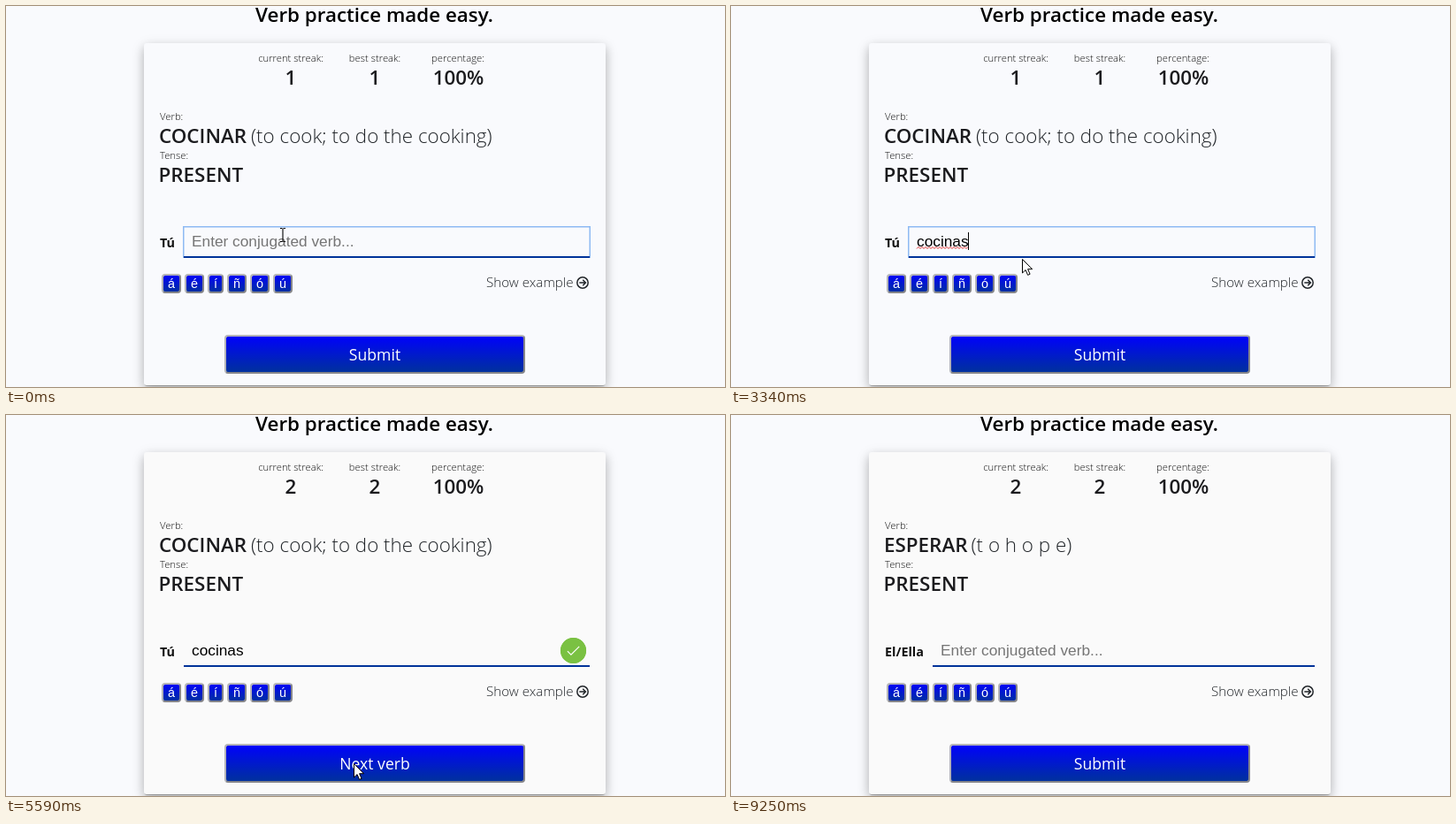
These frames come from a looping animation (813 by 431 pixels, 9.35 s). An HTML page:

```html
<!DOCTYPE html>
<html lang="en">
<head>
<meta charset="utf-8">
<title>Verb practice</title>
<style>
  html, body { margin: 0; width: 100%; height: 100%; overflow: hidden; background: #f9fafd; }
  div, svg { position: absolute; box-sizing: border-box; }
  #card {
    left: 156px; top: 42px; width: 522px; height: 387px; border-radius: 3px;
    box-shadow: 0 5px 11px rgba(0,0,0,.18), 0 4px 15px rgba(0,0,0,.15), 0 2px 1px -1px rgba(0,0,0,.25);
  }
  .btn {
    display: flex; align-items: center; justify-content: center; color: #fff;
    border: 2px solid; border-color: #b4b4b8 #85858a #85858a #b4b4b8; border-radius: 4px;
    background: linear-gradient(#00f, #039) border-box;
  }
  .btn.down { border-color: #85858a #b4b4b8 #b4b4b8 #85858a; }
  .key { top: 303px; height: 22px; font: 14.4px "Liberation Sans", Arial, sans-serif; }
  #submit { left: 247px; top: 372px; width: 340px; height: 44px; font: 17.6px "Open Sans", sans-serif; }
  svg { left: 0; top: 0; }
  text { font: 300 22.4px "Open Sans", sans-serif; fill: #212529; white-space: pre; }
  .big { font-weight: 600; fill: #1b1b1e; }
  .small { font-size: 11.3px; fill: #111; }
  .mid { text-anchor: middle; }
  .field { font: 17.3px "Liberation Sans", Arial, sans-serif; fill: #000; }
  #hint { fill: #757575; }
</style>
</head>
<body>
<div id="card"></div>
<div id="submit" class="btn"></div>
<svg width="813" height="431" viewBox="0 0 813 431" fill="none">
  <text class="big mid" x="416.5" y="18" style="fill:#000">Verb practice made easy.</text>
  <text class="small mid" x="322" y="63">current streak:</text>
  <text class="small mid" x="417" y="63">best streak:</text>
  <text class="small mid" x="511" y="63">percentage:</text>
  <text class="big mid" x="322" y="89" id="streak"></text>
  <text class="big mid" x="417" y="89" id="best"></text>
  <text class="big mid" x="511.5" y="89">100%</text>
  <text class="small" x="174" y="129">Verb:</text>
  <text class="big" x="173" y="155" id="verb"></text>
  <text y="155" id="meaning"></text>
  <text class="small" x="174" y="173">Tense:</text>
  <text class="big" x="172.5" y="199">PRESENT</text>
  <text x="174" y="273" id="person" style="font-size:14.4px;font-weight:700;fill:#111"></text>

  <path id="line" stroke="#039" stroke-width="2"/>
  <rect id="focus" x="200.75" y="249.75" width="459.5" height="34.5" stroke="#8ebaf3" stroke-width="1.5"/>
  <path id="focusLine" d="M201 284h459" stroke="#039" stroke-width="2"/>
  <text class="field" y="272" id="hint">Enter conjugated verb...</text>
  <text class="field" x="210" y="272" id="answer"></text>
  <path id="squiggle" stroke="#e03030"/>
  <rect id="caret" width="1" height="20" fill="#000"/>

  <text x="543" y="318" style="font-size:15.2px">Show example</text>
  <g stroke="#212529" stroke-width="1.5">
    <circle cx="652" cy="313" r="6.2"/>
    <path d="M648.3 313h6.6M652.2 309.8l3.2 3.2l-3.2 3.2"/>
  </g>

  <g id="tick">
    <circle id="ring" r="14" stroke="#7ac142" transform="scale(1)"/>
    <circle id="disc" stroke="#7ac142"/>
    <path id="check" d="M-6.6 .7l4 4l9.3 -9.4" stroke="#fff" stroke-width="1.15" pathLength="1"/>
  </g>

  <path id="beam" d="M-3 -7.5h2.5M.5 -7.5h2.5M0 -7v14M-3 7.5h2.5M.5 7.5h2.5" stroke="#000" stroke-width="1.1"/>
  <path id="arrow" d="M.5 .5v15.5l3.6 -3.4l2.5 5.8l2.5 -1.1l-2.5 -5.6h5z" fill="#fff" stroke="#000"/>
</svg>
<script>
const LOOP = 9350;
const $ = id => document.getElementById(id);
const set = (id, attrs) => { for (const k in attrs) $(id).setAttribute(k, attrs[k]); };
const show = (id, on) => { $(id).style.display = on ? '' : 'none'; };
const write = (id, s) => { if ($(id).textContent !== s) $(id).textContent = s; };
const within = (t, a, b) => t >= a && t < b;
const ease = p => { p = Math.min(1, Math.max(0, p)); return p * p * (3 - 2 * p); };

// Accent keys
let keyX = 176;
for (const c of 'áéíñóú') {
  const key = document.createElement('div'), w = c === 'í' ? 18 : 22;
  key.className = 'btn key';
  key.textContent = c;
  key.style.left = keyX + 'px';
  key.style.width = w + 'px';
  $('submit').before(key);
  keyX += w + 4;
}

let wave = 'M210 274.5';
for (let i = 0; i < 29; i++) wave += i % 2 ? 'l2 2' : 'l2 -2';
set('squiggle', { d: wave });

const typing = [[1850, 'cocinas'], [1550, 'cocin'], [1395, 'coci'], [1240, 'coc'], [1085, 'co'], [930, 'c'], [0, '']];
const caretOn = [[160, 630], [930, 2440], [2910, 3380], [3850, 4190]];
const tickSteps = [4320, 4470, 4610, 4740, 4880, 5010, 5140, 5290, 5440, 5590];

function drawField(t, renewed) {
  const answer = renewed ? '' : typing.find(([at]) => t >= at)[1];
  const focused = t < 4190, left = renewed ? 228 : 201;
  write('answer', answer);
  show('hint', !answer);
  set('hint', { x: left + 9 });
  set('line', { d: `M${left} 284H660` });
  show('focus', focused);
  show('focusLine', focused);
  show('squiggle', within(t, 2910, 4190));
  show('caret', caretOn.some(([a, b]) => within(t, a, b)));
  const width = answer ? $('answer').getComputedTextLength() : 0;
  set('caret', { x: Math.floor(210 + width), y: answer ? 256 : 257 });
}

function drawTick(t) {
  show('tick', within(t, 4470, 7490));
  const s = (tickSteps.filter(at => at <= t).pop() - 4320) / 1000 || 0;
  const around = 88 * ease(s / .6);
  const fill = Math.min(14.5, 30 * ease((s - .4) / .4));
  const bump = (s - .9) / .3;
  const scale = 1 + .1 * (bump < .5 ? ease(bump * 2) : ease(2 - bump * 2));
  set('tick', { transform: `translate(641.5 266.5) scale(${scale})` });
  set('ring', { 'stroke-dasharray': `${around} 200`, 'stroke-width': 1.15 });
  set('disc', { r: 14.5 - fill / 2, 'stroke-width': fill });
  const drawn = ease((s - .8) / .3);
  set('check', { 'stroke-dasharray': `${drawn} 2` });
  show('check', drawn > 0);
}

function drawMouse(t) {
  const p = ease(Math.floor((t - 2910) / 144) / 7);
  let x = 313 + 80 * p, y = 259 + 135 * p;
  if (t >= 8230) { x = 397; y = 405; }
  if (t >= 8370) { x = 405; y = 422; }
  const overField = y < 285;
  show('beam', overField);
  show('arrow', !overField && t < 8510);
  set(overField ? 'beam' : 'arrow', { transform: `translate(${Math.round(x)} ${Math.round(y)})` });
}

function draw(t) {
  const scored = t >= 4320, renewed = t >= 7490;
  $('card').style.background = t < 4190 ? '#f9fafd' : '#fafafa';
  write('streak', scored ? '2' : '1');
  write('best', scored ? '2' : '1');
  write('verb', renewed ? 'ESPERAR' : 'COCINAR');
  write('meaning', renewed ? '(t o h o p e)' : '(to cook; to do the cooking)');
  set('meaning', { x: renewed ? 271.5 : 277 });
  write('person', renewed ? 'El/Ella' : 'Tú');
  write('submit', within(t, 4320, 7030) ? 'Next verb' : 'Submit');
  $('submit').classList.toggle('down', within(t, 4190, 4320) || within(t, 6880, 7030));
  drawField(t, renewed);
  drawTick(t);
  drawMouse(t);
}

const start = performance.now();
function frame() {
  draw((performance.now() - start) % LOOP);
  requestAnimationFrame(frame);
}
frame();
</script>
</body>
</html>
```
